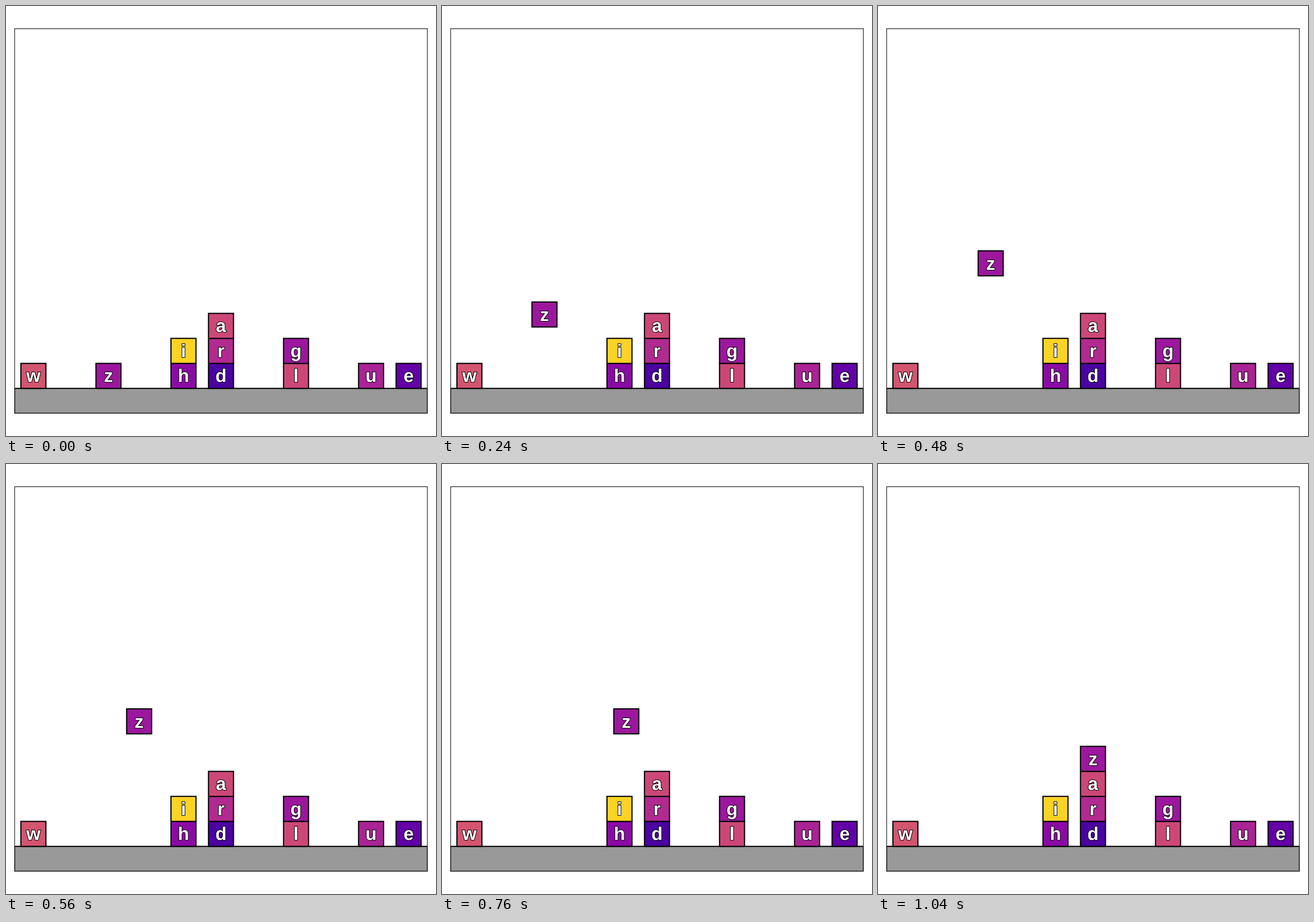
An HTML page that plays this animation: 748 by 748 pixels, repeating every 1080 ms.

```html
<!DOCTYPE html>
<html lang="en">
<head>
<meta charset="utf-8">
<title>Letter blocks</title>
<style>
html, body { margin: 0; width: 100%; height: 100%; overflow: hidden; background: #fff; }
svg { display: block; width: 748px; height: 748px; }
.block rect { stroke: #000; stroke-width: 2; }
text {
  font: bold 32px "Liberation Sans", Arial, sans-serif;
  text-anchor: middle;
  text-rendering: geometricPrecision;
  fill: #fff; stroke: #000; stroke-width: 2; stroke-linejoin: round;
  paint-order: stroke;
}
</style>
</head>
<body>
<svg viewBox="0 0 748 748">
  <clipPath id="frame"><rect x="15" y="39.5" width="718" height="669"/></clipPath>
  <g id="scene" clip-path="url(#frame)">
    <rect x="15" y="665.2" width="718" height="43.5" fill="#999" stroke="#000" stroke-width="2"/>
  </g>
  <rect x="15" y="39.5" width="718" height="669" fill="none" stroke="#222" stroke-width="1.2"/>
</svg>
<script>
const NS = "http://www.w3.org/2000/svg";
const UNIT = 43.51, FLOOR = 665.2, MID = 374;
const STEP_MS = 40, STEPS = 27;

// letter, column from the centre, height in blocks, colour
const blocks = [
  ["w", -5, 0, "#d3556f"],
  ["h", -1, 0, "#8b0aa5"], ["i", -1, 1, "#fcd225"],
  ["d", 0, 0, "#4b03a1"], ["r", 0, 1, "#b12a90"], ["a", 0, 2, "#cc4778"],
  ["l", 2, 0, "#cc4778"], ["g", 2, 1, "#9c179e"],
  ["u", 4, 0, "#aa2395"], ["e", 5, 0, "#6300a7"],
  ["z", -3, 0, "#9c179e"]
];

// step, column, height
const path = [[0, -3, 0], [11, -3, 4.5], [22, 0, 4.5], [26, 0, 3]];

function add(parent, tag, attrs) {
  const el = document.createElementNS(NS, tag);
  for (const key in attrs) el.setAttribute(key, attrs[key]);
  return parent.appendChild(el);
}

function place(el, col, height) {
  const x = MID + col * 1.5 * UNIT;
  const y = FLOOR - (height + 1) * UNIT;
  el.setAttribute("transform", `translate(${x.toFixed(2)} ${y.toFixed(2)})`);
}

function makeBlock([letter, col, height, fill]) {
  const g = add(document.getElementById("scene"), "g", { class: "block" });
  add(g, "rect", { x: -UNIT / 2, y: 0, width: UNIT, height: UNIT, fill });
  add(g, "text", { x: 0, y: 32.7 }).textContent = letter;
  place(g, col, height);
  return g;
}

const mover = blocks.map(makeBlock).pop();
const start = performance.now();

function draw(now) {
  const step = Math.floor(Math.max(0, now - start) / STEP_MS) % STEPS;
  const k = Math.max(1, path.findIndex(p => p[0] >= step));
  const [s0, c0, h0] = path[k - 1], [s1, c1, h1] = path[k];
  const f = (step - s0) / (s1 - s0);
  place(mover, c0 + (c1 - c0) * f, h0 + (h1 - h0) * f);
  requestAnimationFrame(draw);
}
draw(start);
</script>
</body>
</html>
```
